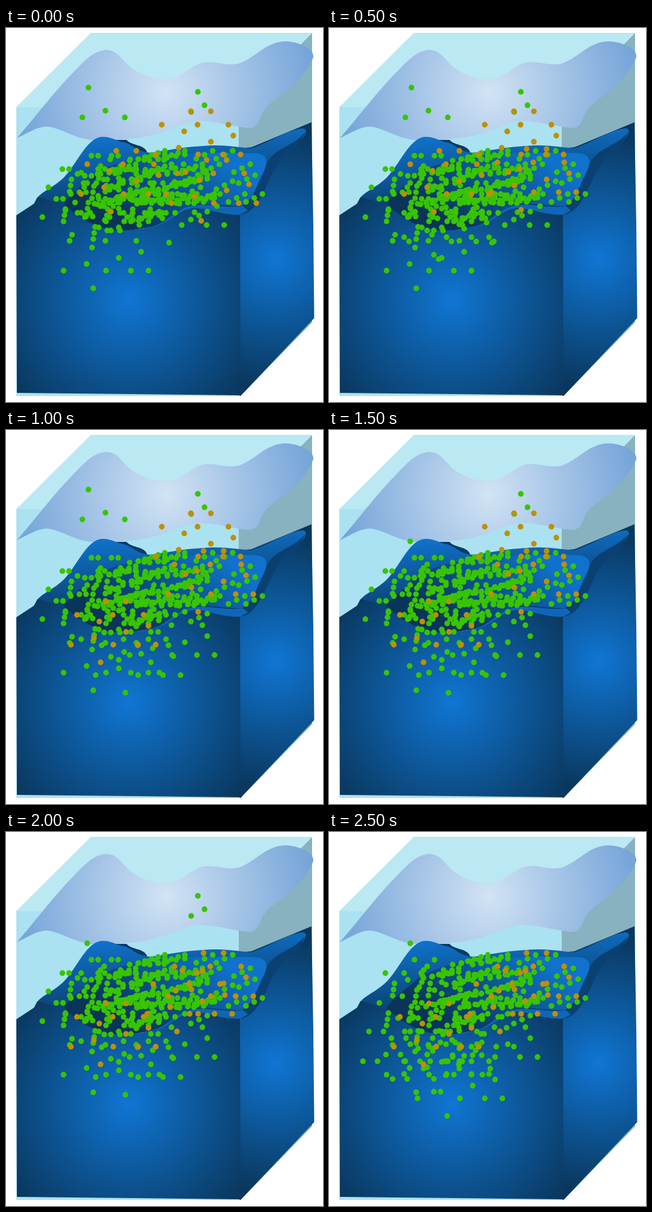
An HTML page for the animation above (3000 ms loop, 523 by 615 pixels).

```html
<!DOCTYPE html>
<html lang="en">
<head>
<meta charset="utf-8">
<title>Particles in water</title>
<style>
html, body { margin: 0; width: 100%; height: 100%; overflow: hidden; background: #fff; }
svg { display: block; width: 523px; height: 615px; }
</style>
</head>
<body>
<svg viewBox="0 0 523 615" xmlns="http://www.w3.org/2000/svg">
  <defs>
    <radialGradient id="air" gradientUnits="userSpaceOnUse" cx="264" cy="106" r="242">
      <stop offset="0" stop-color="#d2e3f4"/><stop offset="1" stop-color="#77a5d9"/>
    </radialGradient>
    <radialGradient id="front" gradientUnits="userSpaceOnUse" cx="203" cy="447" r="238">
      <stop offset="0" stop-color="#1076d3"/><stop offset="1" stop-color="#0a375d"/>
    </radialGradient>
    <radialGradient id="side" gradientUnits="userSpaceOnUse" cx="445" cy="380" r="212">
      <stop offset="0" stop-color="#1076d3"/><stop offset="1" stop-color="#0a375d"/>
    </radialGradient>
    <linearGradient id="swell" gradientUnits="userSpaceOnUse" x1="250" y1="170" x2="262" y2="295">
      <stop offset="0" stop-color="#1072cc"/><stop offset="1" stop-color="#0a3b65"/>
    </linearGradient>
    <linearGradient id="dip" gradientUnits="userSpaceOnUse" x1="325" y1="190" x2="225" y2="335">
      <stop offset="0" stop-color="#1072cc"/><stop offset="1" stop-color="#0a3459"/>
    </linearGradient>
  </defs>

  <path fill="#aae2f1" d="M17 130H384V605H17Z"/>
  <path fill="#88b2bf" d="M384 130 505 8V484L387 605 384 604Z"/>
  <path fill="#bae8f3" d="M17 130 140 8H505L384 130Z"/>
  <path fill="url(#air)" d="M18 181C44 152 79 105 112 72C132 51 146 37 166 36C188 37 192 57 212 69C228 79 245 84 264 84C294 82 306 58 330 56C350 55 361 62 382 59C411 51 427 22 462 22C484 23 509 34 507 48C501 64 486 84 468 100C447 117 428 126 421 144C416 160 410 166 396 164C370 161 347 153 319 153C287 155 273 170 238 177C205 184 169 185 140 184C108 180 91 164 67 162C49 163 36 173 18 181Z"/>

  <path fill="url(#side)" d="M384 198 405 196 504 155 507 325 508.500 477 387 605 384 604Z"/>
  <path fill="#0a3b66" d="M165 184H199C207 194 229 191 233 205L234 215H180Z"/>
  <path fill="url(#swell)" d="M50 283C54 270 80 263 98 243C121 216 133 183 157 179C175 178 181 186 195 188C212 193 214 204 240 205C268 201 290 196 325 194C355 191 382 196 405 198C435 188 466 167 490 165C499 167 494 176 487 184C473 201 453 215 441 236C427 264 414 304 386 307L290 318 190 336H95Z"/>
  <path fill="#0b4073" d="M494 171C472 197 442 196 429 225C420 258 410 287 388 300L386 307C414 304 427 264 441 236C453 215 473 201 487 184Z"/>
  <path fill="url(#dip)" d="M92 295C102 275 128 258 148 240C180 220 218 213 244 211C300 204 370 205 413 206C433 208 433 222 424 238C413 258 408 286 388 293C360 294 330 286 303 291C275 308 245 331 190 333C150 331 120 316 92 295Z"/>
  <path fill="url(#front)" d="M17 308 46 289 52 278C70 282 85 288 98 291C119 312 148 331 188 333C238 333 267 317 285 304C301 292 320 292 338 298C355 304 369 307 386 307L387 604 18 600Z"/>
  <path fill="#0f66b8" d="M240 328C267 319 283 295 310 291C337 288 362 297 391 293L399 300 386 307C352 308 336 296 310 296C283 299 271 321 240 328Z"/>
  <g id="dots"></g>
</svg>
<script>
const LOOP = 3000, STEP = 500;
const NS = 'http://www.w3.org/2000/svg';
const GREEN = '#38c400', AMBER = '#bd9004';
const layer = document.getElementById('dots');
const groups = [];

// Every cloud of particles repeats this motif: x positions per height
const motif = Object.entries({
  0: [0, 33], 22: [-48, 11, 62], 33: [-11], 40: [70], 50: [33],
  60: [-20], 71: [-58, 12, 53, 82], 100: [-9]
}).flatMap(([y, xs]) => xs.map(x => [x, +y]));

function make(tag, attrs, parent) {
  const el = document.createElementNS(NS, tag);
  for (const k in attrs) el.setAttribute(k, attrs[k]);
  return parent.appendChild(el);
}

// Keys are [step, x, y]; the clump holds each place until the next key
function clump(fill, keys, keep = () => true) {
  const g = make('g', { fill }, layer);
  for (const [cx, cy] of motif.filter(keep)) make('circle', { cx, cy, r: 4.7 }, g);
  groups.push({ g, keys });
}

// Resting clumps, spaced evenly along a line
function row(n, x, y, dx = 0, dy = 0) {
  for (let i = 0; i < n; i++) clump(GREEN, [[0, x + i * dx, y + i * dy]]);
}

row(3, 341, 202, -13.5, 6.5);
row(5, 262, 202, -11, 3.5);
row(5, 262, 208, -14.5, 2.5);
row(3, 156, 227, -1.5, 10);
row(1, 197, 233);
row(1, 141, 210);
row(1, 153, 328);

// Sinking clumps
clump(GREEN, [[0, 118, 240], [5, 114, 306]]);
clump(GREEN, [[0, 152, 210], [5, 138, 306]]);
clump(GREEN, [[0, 182, 233], [5, 182, 306]]);
clump(GREEN, [[0, 228, 217], [5, 223, 282]]);
clump(GREEN, [[0, 278, 253], [2, 262, 299]]);
clump(GREEN, [[0, 176, 233], [1, 182, 273], [5, 182, 327]]);
clump(GREEN, [[0, 172, 216], [1, 190, 280], [2, 206, 332], [5, 204, 367]]);

// Sparse ones in the air
clump(GREEN, [[0, 184, 76], [3, 182, 161]], ([x, y]) => x < 20 && y > 20 && y !== 33 && y < 90 && x !== 11);
clump(GREEN, [[0, 316.5, 105], [5, 291, 228]], ([x, y]) => Math.abs(x) < 12 && y < 40);

clump(AMBER, [[0, 182, 202], [2, 165, 282]]);
clump(AMBER, [[0, 305, 137], [4, 291, 228]]);
clump(AMBER, [[0, 331, 217], [1, 326, 199]]);

let shown = -1;
function draw() {
  const step = Math.floor(performance.now() % LOOP / STEP);
  if (step !== shown) {
    shown = step;
    for (const { g, keys } of groups) {
      const [, x, y] = keys.findLast(k => k[0] <= step);
      g.setAttribute('transform', `translate(${x} ${y})`);
    }
  }
  requestAnimationFrame(draw);
}
draw();
</script>
</body>
</html>
```
